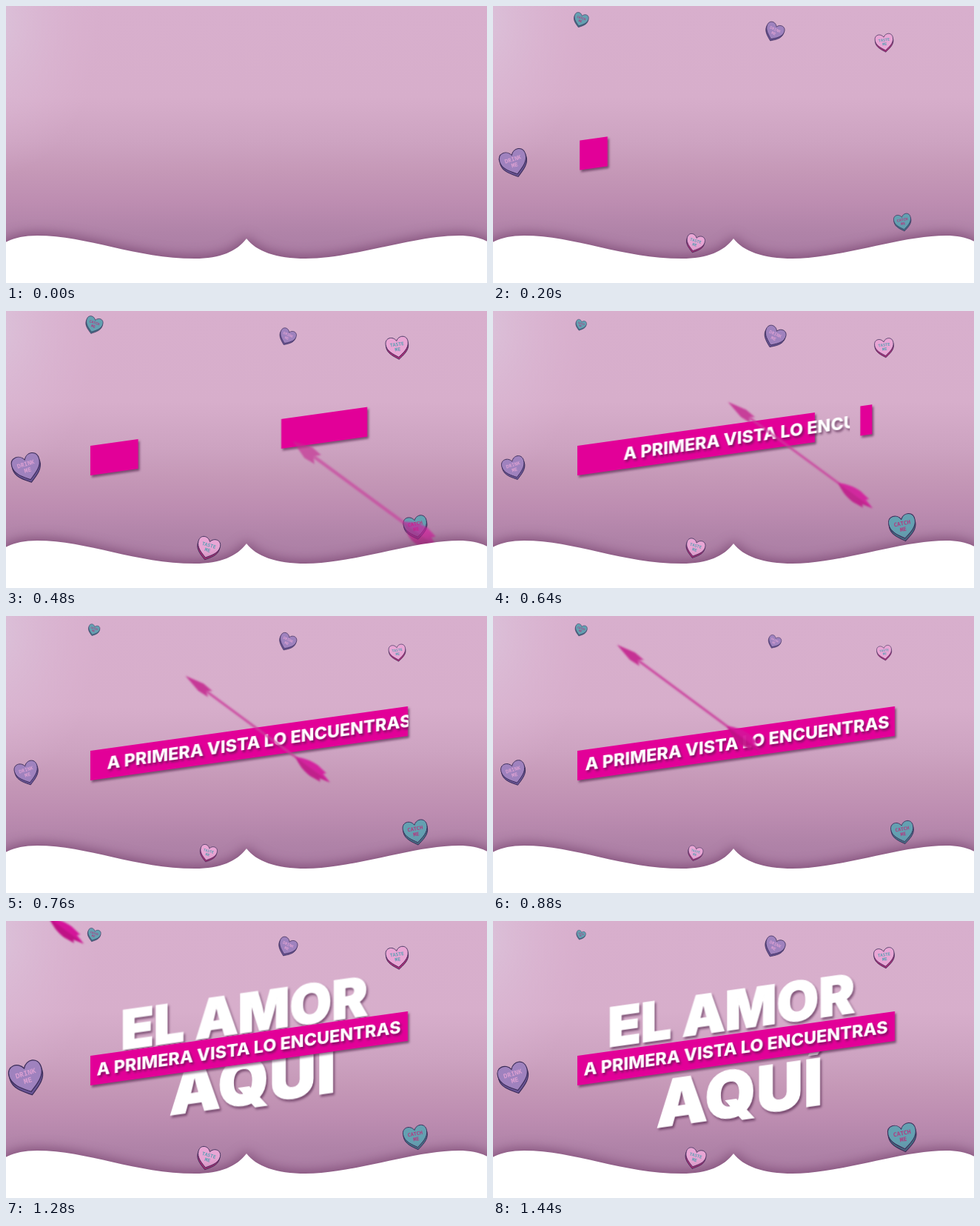
Write an HTML page without scripts that moves like this. It is 650 px wide and 374 px high and loops after 2940 ms.

```html
<!DOCTYPE html>
<html lang="es">
<head>
<meta charset="utf-8">
<title>El amor</title>
<style>
html, body { margin: 0; width: 100%; height: 100%; overflow: hidden; background: #fff; }
svg { display: block; width: 100%; height: 100%; }
text { font-family: Inter, "Open Sans", sans-serif; font-optical-sizing: none; fill: #fff; text-anchor: middle; }
.line { font-size: 23.4px; font-weight: 800; }
.big { font-weight: 900; stroke: #fff; stroke-width: 1.6; }
.shade { filter: drop-shadow(2px 3px 1.5px rgba(70, 25, 65, .6)); }
.wave { filter: drop-shadow(0 -3px 8px rgba(100, 45, 90, .6)); }

.scene, .heart, .lead, .fill, .wipe, .slide, .rise, .drop, .arrow { animation: 2940ms linear infinite; }
.scene { animation-name: scene; animation-timing-function: step-end; }
.lead { animation-name: lead; }
.fill { animation-name: fill; }
.wipe { animation-name: wipe; }
.slide { animation-name: slide; }
.rise { animation-name: rise; }
.drop { animation-name: drop; }
.arrow { animation-name: arrow; }

/* candy hearts */
.heart { animation-timing-function: ease-in-out; }
.heart text { font: 700 8.4px "Noto Sans Mono", "DejaVu Sans Mono", monospace; fill: var(--ink); }
.face { fill: var(--face); stroke: #3a2c58; stroke-width: 1.1; }
.side { fill: var(--side); stroke: #3a2c58; stroke-width: 1.1; }
.purple { --face: #9f82be; --side: #6a5596; --ink: #dba0d2; }
.pink { --face: #e9a6d5; --side: #ad2c78; --ink: #5c9fb4; }
.teal { --face: #64a0b1; --side: #437488; --ink: #b23a80; }
.p1 { animation-name: p1; }
.p2 { animation-name: p2; }
.p3 { animation-name: p3; }
.p4 { animation-name: p4; }
.p5 { animation-name: p5; }

@keyframes scene { 0% { visibility: hidden; } 1.36%, 100% { visibility: visible; } }

@keyframes p1 {
  0% { scale: .4; } 10.88% { scale: .52; } 16.33% { scale: .57; } 21.77% { scale: .36; }
  29.93% { scale: .4; } 38.1% { scale: .57; } 48.98%, 100% { scale: .31; }
}
@keyframes p2 {
  0% { scale: .5; } 10.88% { scale: .67; } 16.33% { scale: .55; } 21.77% { scale: .71; }
  29.93% { scale: .43; } 38.1% { scale: .57; } 48.98%, 100% { scale: .67; }
}
@keyframes p3 {
  0% { scale: .55; } 10.88% { scale: .64; } 16.33% { scale: .76; } 21.77% { scale: .64; }
  29.93% { scale: .5; } 38.1% { scale: .76; } 39.46% { scale: .8; } 48.98%, 100% { scale: .69; }
}
@keyframes p4 {
  0% { scale: .7; } 10.88% { scale: 1; } 13.61% { scale: 1.13; } 16.33% { scale: .96; } 21.77% { scale: .77; }
  29.93% { scale: .81; } 38.1% { scale: 1.17; } 39.46% { scale: 1.2; } 48.98%, 100% { scale: 1.02; }
}
@keyframes p5 {
  0% { scale: .65; } 10.88% { scale: .55; } 16.33% { scale: .79; } 21.77% { scale: .9; }
  29.93% { scale: .76; } 38.1% { scale: .67; } 48.98%, 100% { scale: .95; }
}

/* banner: a leading strip runs through, a second one fills behind it */
@keyframes lead {
  0%, 1.36% { x: 0px; width: 0px; }
  6.8% { x: 3px; width: 37px; }
  8.16% { x: 10px; width: 60px; }
  10.88% { x: 40px; width: 170px; }
  13.61% { x: 140px; width: 180px; }
  16.33% { x: 257px; width: 117px; }
  19.05% { x: 346px; width: 44px; }
  21.77% { x: 382px; width: 16px; }
  24.49% { x: 416px; width: 9px; }
  25.85%, 100% { x: 429px; width: 0px; }
}
@keyframes fill {
  0%, 8.16% { width: 0px; }
  10.88% { width: 3px; }
  13.61% { width: 25px; }
  16.33% { width: 63px; }
  19.05% { width: 205px; }
  21.77% { width: 320px; }
  24.49% { width: 396px; }
  25.85%, 100% { width: 429px; }
}
@keyframes wipe {
  0%, 17.69% { width: 0px; }
  21.77% { width: 367px; }
  25.85%, 100% { width: 429px; }
}
@keyframes slide {
  0%, 17.69% { transform: translateX(140px); }
  21.77% { transform: translateX(54px); }
  25.85% { transform: translateX(14px); }
  29.93% { transform: translateX(2px); }
  34.01%, 100% { transform: none; }
}
@keyframes rise {
  0%, 33.33% { transform: translateY(64px); }
  38.1% { transform: translateY(21px); }
  42.18% { transform: translateY(5px); }
  47.62%, 100% { transform: none; }
}
@keyframes drop {
  0%, 38.1% { transform: translateY(-85px); }
  42.18% { transform: translateY(-25px); }
  45.58% { transform: translateY(-5px); }
  48.98%, 100% { transform: none; }
}
@keyframes arrow {
  0%, 5.44% { transform: translate(650px, 345px) rotate(34deg) scaleY(2.4); opacity: 0; }
  6.8% { transform: translate(600px, 314px) rotate(34deg) scaleY(2.4); opacity: .4; }
  10.88% { transform: translate(405px, 214px) rotate(34.5deg) scaleY(2.2); opacity: .4; }
  16.33% { transform: translate(388px, 176px) rotate(36.3deg) scaleY(1.5); opacity: .65; }
  21.77% { transform: translate(318px, 123px) rotate(36.3deg); opacity: .85; }
  29.93% { transform: translate(168px, 39px) rotate(36.5deg); opacity: .95; }
  38.1% { transform: translate(32px, -41px) rotate(36.6deg); opacity: 1; }
  47.62%, 100% { transform: translate(-180px, -168px) rotate(36.6deg); opacity: 1; }
}
</style>
</head>
<body>
<svg viewBox="0 0 650 374" preserveAspectRatio="none">
  <defs>
    <linearGradient id="sky" x1="0" y1="0" x2="0" y2="340" gradientUnits="userSpaceOnUse">
      <stop offset="0" stop-color="#d8afcd"/>
      <stop offset=".36" stop-color="#d7aecb"/>
      <stop offset=".54" stop-color="#cda3c1"/>
      <stop offset=".66" stop-color="#c598b7"/>
      <stop offset=".78" stop-color="#bd8db1"/>
      <stop offset=".9" stop-color="#b083a8"/>
      <stop offset="1" stop-color="#ab7da4"/>
    </linearGradient>
    <radialGradient id="glow">
      <stop offset="0" stop-color="#dcc6dc" stop-opacity=".9"/>
      <stop offset="1" stop-color="#dcb4d2" stop-opacity="0"/>
    </radialGradient>
    <path id="shape" d="M0 18C-8 12-20 5-20-7C-20-20-5-21 0-11C5-21 20-20 20-7C20 5 8 12 0 18Z"/>
    <g id="candy">
      <use href="#shape" class="side" y="3"/>
      <use href="#shape" class="face" y="-1"/>
    </g>
    <clipPath id="wipe"><rect class="wipe" y="-20" width="0" height="80"/></clipPath>
    <clipPath id="above"><rect x="-20" y="-120" width="480" height="120"/></clipPath>
    <clipPath id="below"><rect x="-20" y="40" width="480" height="140"/></clipPath>
  </defs>

  <rect width="650" height="374" fill="url(#sky)"/>
  <ellipse cx="-20" cy="20" rx="150" ry="210" fill="url(#glow)"/>

  <g class="scene">
    <g transform="translate(118.5 19) rotate(18)"><g class="heart teal p1">
      <use href="#candy"/><text y="-3">CATCH</text><text y="6">ME</text>
    </g></g>
    <g transform="translate(380 35) rotate(24)"><g class="heart purple p2">
      <use href="#candy"/><text y="-3">DRINK</text><text y="6">ME</text>
    </g></g>
    <g transform="translate(529 49.5) rotate(-8)"><g class="heart pink p3">
      <use href="#candy"/><text y="-3">TASTE</text><text y="6">ME</text>
    </g></g>
    <g transform="translate(28.5 212) rotate(-17)"><g class="heart purple p4">
      <use href="#candy"/><text y="-3">DRINK</text><text y="6">ME</text>
    </g></g>
    <g transform="translate(273 320.5) rotate(16)"><g class="heart pink p3">
      <use href="#candy"/><text y="-3">TASTE</text><text y="6">ME</text>
    </g></g>
    <g transform="translate(553.8 292) rotate(-11)"><g class="heart teal p5">
      <use href="#candy"/><text y="-3">CATCH</text><text y="6">ME</text>
    </g></g>

    <g transform="matrix(1 -.14 0 1 114 182)">
      <g clip-path="url(#above)"><g class="rise"><text class="big shade" x="208" y="-6" font-size="73">EL AMOR</text></g></g>
      <g clip-path="url(#below)"><g class="drop"><text class="big shade" x="219.5" y="112" font-size="87" letter-spacing="1">AQUÍ</text></g></g>
      <g class="shade" fill="#e20098">
        <rect class="fill" width="0" height="40"/>
        <rect class="lead" width="0" height="40"/>
      </g>
      <g clip-path="url(#wipe)"><g class="slide"><text class="line shade" x="214" y="28.4">A PRIMERA VISTA LO ENCUENTRAS</text></g></g>
    </g>

    <g class="arrow">
      <g style="filter: blur(.8px)">
        <path d="M28 0H200" stroke="#c93c9b" stroke-width="3"/>
        <path d="M0 0L26-6L42-5L34 0L42 5L26 6Z" fill="#c42a90"/>
        <path d="M184 0C194-5 204-9 216-9L232-7L228-4L243 0Z" fill="#d4149a"/>
        <path d="M184 0C194 5 204 9 216 9L232 7L228 4L243 0Z" fill="#bf1186"/>
      </g>
    </g>
  </g>

  <path class="wave" fill="#fff" d="M-20 335C-10 322 8 310 42 310C110 310 175 341 255 341C290 341 312 331 325 314C338 331 365 341 405 341C470 341 550 310 612 310C642 310 660 320 670 335V400H-20Z"/>
</svg>
</body>
</html>
```
